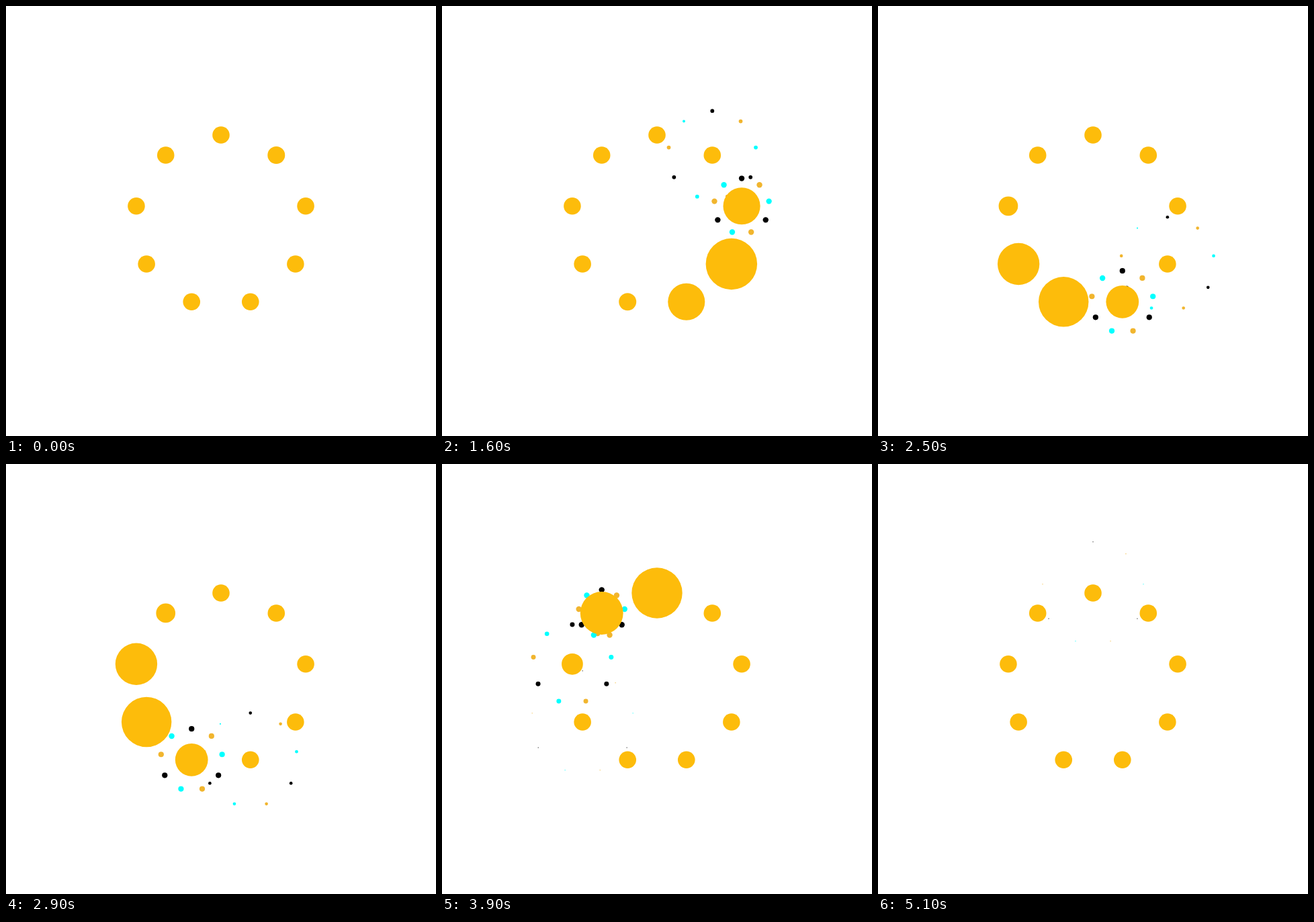
An HTML page with a canvas for the animation above (5200 ms loop, 640 by 640 pixels).

```html
<!DOCTYPE html>
<html lang="en">
<head>
<meta charset="utf-8">
<title>Bursting dots</title>
<style>
  html, body { margin: 0; width: 100%; height: 100%; overflow: hidden; background: #fff; }
  canvas { display: block; width: 640px; height: 640px; }
</style>
</head>
<body>
<canvas id="stage" width="640" height="640"></canvas>
<script>
const ctx = document.getElementById('stage').getContext('2d');
const LOOP = 5200, STEP = 40, STAGGER = 400, COUNT = 9;
const CENTER = 320, RING = 128, DOT = 12.8, SPARK = 4.2;
const GOLD = '#fdbc0b';
const SPARK_COLORS = ['#000', '#f1b52e', '#0ff'];

const progress = (s, from, to) => Math.min(1, Math.max(0, (s - from) / (to - from)));
const smooth = u => u * u * (3 - 2 * u);

// cubic-bezier(.333, 0, .833, .833), solved by fixed-point iteration
function easeIn(x) {
  let p = x;
  for (let i = 0; i < 16; i++) p = x - 0.5 * p * p * (1 - p);
  return x - p * (1 - p) ** 2;
}

function disc(x, y, r, color) {
  if (r <= 0) return;
  ctx.fillStyle = color;
  ctx.beginPath();
  ctx.arc(x, y, r, 0, 2 * Math.PI);
  ctx.fill();
}

// Point on a circle, counted clockwise from the top in ninths of a turn
function around(cx, cy, r, index) {
  const a = index * 2 * Math.PI / COUNT;
  return [cx + r * Math.sin(a), cy - r * Math.cos(a)];
}

function drawSparks(x, y, s) {
  if (s < 800 || s >= 2000) return;
  const spread = 25.6 + 51.2 * smooth(progress(s, 800, 2000));
  const size = SPARK * (1 - progress(s, 1200, 1980) ** 2);
  const lastSize = SPARK * (1 - smooth(progress(s, 1360, 1900)));
  for (let i = 0; i < COUNT; i++) {
    const r = i === COUNT - 1 ? lastSize : size;
    disc(...around(x, y, spread, i), r, SPARK_COLORS[i % 3]);
  }
}

function dotRadius(s) {
  const swell = s < 800 ? smooth(progress(s, 0, 800)) : 1 - easeIn(progress(s, 800, 1600));
  return DOT * (1 + 2 * swell);
}

function draw(time) {
  ctx.fillStyle = '#fff';
  ctx.fillRect(0, 0, 640, 640);
  const dots = Array.from({ length: COUNT }, (_, i) => ({
    pos: around(CENTER, CENTER, RING, i + 1),
    s: time - i * STAGGER
  }));
  for (const { pos, s } of dots) drawSparks(...pos, s);
  for (const { pos, s } of dots) disc(...pos, dotRadius(s), GOLD);
}

// The motion advances at 25 steps per second
function tick() {
  const t = (performance.now() + 8) % LOOP;
  draw((Math.floor(t / STEP) + 1) * STEP);
  requestAnimationFrame(tick);
}
tick();
</script>
</body>
</html>
```
